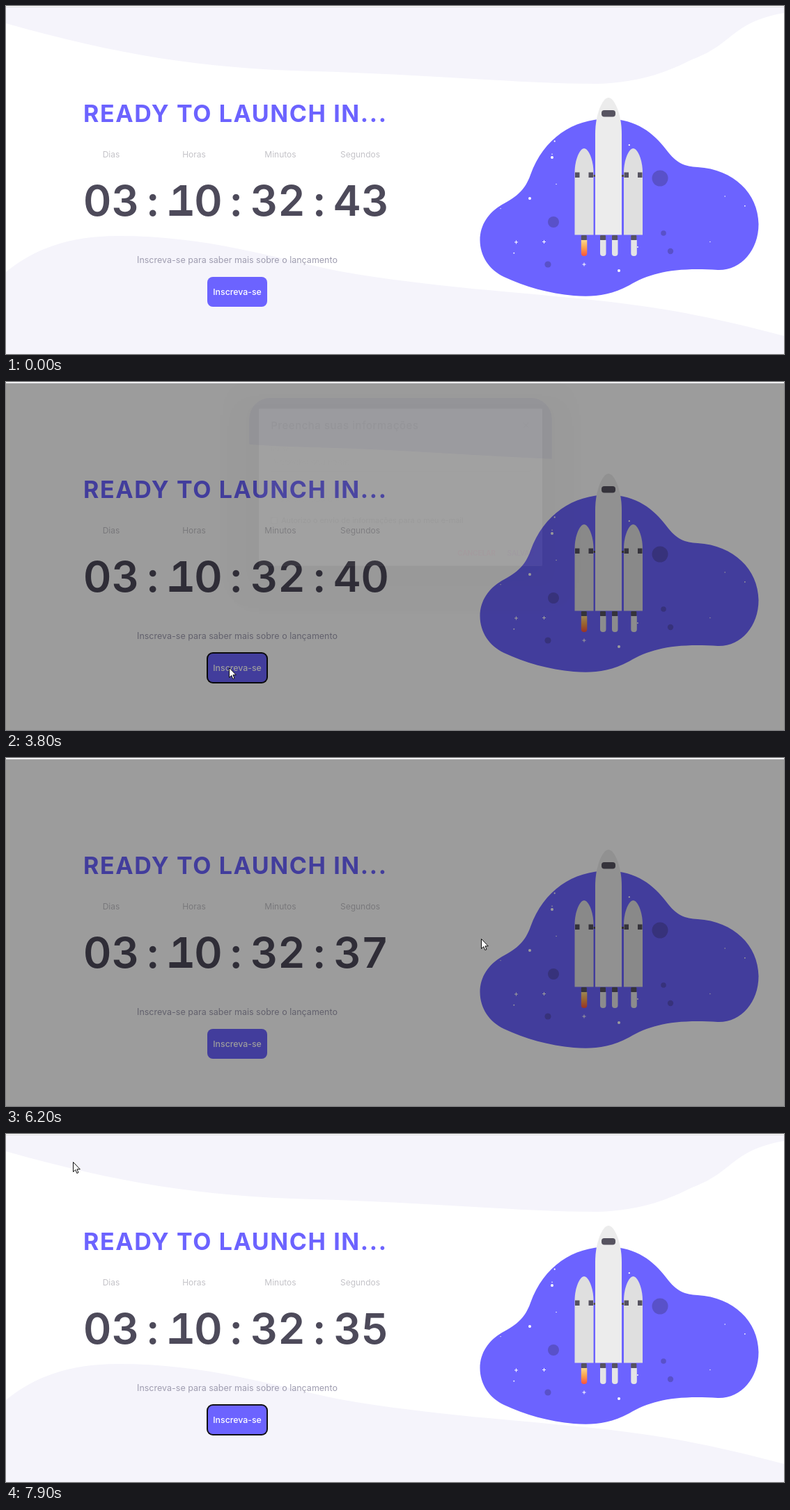
Write an HTML page with a canvas that moves like this. It is 1117 px wide and 501 px high and loops after 8000 ms.

```html
<!DOCTYPE html>
<html lang="pt">
<head>
<meta charset="utf-8">
<title>Ready to launch</title>
<style>
  html, body { margin: 0; width: 100%; height: 100%; overflow: hidden; background: #fff; }
  canvas { display: block; }
</style>
</head>
<body>
<canvas id="stage" width="1117" height="501"></canvas>
<script>
const W = 1117, H = 501, LOOP = 8000, STEP = 100;
const ctx = document.getElementById('stage').getContext('2d');
const PURPLE = '#6c63ff', DARK = '#4d4a5a', METAL = '#565360', LAVENDER = '#f5f4fb';
const SCRIM_ALPHA = .39;
const DIALOG = { x: 333, y: 22, w: 467, h: 259, cx: 566.5, cy: 151.5 };

const topWave = new Path2D(`M0 25 C160 70 280 90 440 94 S740 112 850 112
  C915 110 955 92 985 77 C1045 55 1040 24 ${W} 10 V0 H0Z`);
const bottomWave = new Path2D(`M0 383 C40 350 90 331 160 331 C290 331 380 362 480 382
  C610 405 740 412 850 424 S1030 452 ${W} 475 V${H} H0Z`);
const blob = new Path2D(`M680.5 337 C680.5 315 693 297 712 286 C735 274 746 263 753 243
  C772 190 815 162 865 162.5 C905 163 930 183 948 207 C963 227 975 231 993 232
  C1045 235 1080 270 1080.5 314 C1080.5 352 1055 381 1022 380 C960 376 925 384 895 402
  C865 418 840 419 815 417 C780 414 745 404 715 390 C694 380 680.5 360 680.5 337Z`);

// Pointer legs: [from ms, to ms, x, y]
const ARRIVE = [[600, 600, 11, 7], [600, 1000, 81, 241], [1100, 1700, 141, 408], [2500, 3200, 320, 411],
  [4900, 5300, 598, 285], [5400, 5900, 682, 260], [6200, 6400, 672, 280], [6400, 6800, 560, 390]];
const RETURN = [[7300, 7300, 25, 2], [7300, 7900, 96, 40]];

const ramp = (t, from, to) => t >= to ? 1 : Math.max(0, (t - from) / (to - from));
const easeOut = p => 1 - (1 - p) ** 2;

function glide(legs, t) {
  let [, , x, y] = legs[0];
  for (const [from, to, toX, toY] of legs) {
    const p = ramp(t, from, to);
    x += (toX - x) * p;
    y += (toY - y) * p;
  }
  return [x, y];
}

function random(seed) {
  return () => (seed = seed * 16807 % 2147483647) / 2147483647;
}

function rect(x, y, w, h, color, radius = 0) {
  ctx.fillStyle = color;
  ctx.beginPath();
  ctx.roundRect(x, y, w, h, radius);
  ctx.fill();
}

function dot(x, y, r, color) {
  ctx.fillStyle = color;
  ctx.beginPath();
  ctx.arc(x, y, r, 0, Math.PI * 2);
  ctx.fill();
}

function line(x1, y1, x2, y2, color, width = 1) {
  ctx.strokeStyle = color;
  ctx.lineWidth = width;
  ctx.beginPath();
  ctx.moveTo(x1, y1);
  ctx.lineTo(x2, y2);
  ctx.stroke();
}

function text(str, x, y, size, color, { weight = 400, align = 'left', spacing = 0 } = {}) {
  ctx.font = `${weight} ${size}px Inter, sans-serif`;
  ctx.letterSpacing = spacing + 'px';
  ctx.textAlign = align;
  ctx.fillStyle = color;
  ctx.fillText(str, x, y);
}

function hull(x, w, tip, shoulder, bottom, color) {
  const mid = x + w / 2, bend = tip + (shoulder - tip) * .45;
  ctx.fillStyle = color;
  ctx.beginPath();
  ctx.moveTo(x, bottom);
  ctx.lineTo(x, shoulder);
  ctx.bezierCurveTo(x, bend, mid - w * .22, tip, mid, tip);
  ctx.bezierCurveTo(mid + w * .22, tip, x + w, bend, x + w, shoulder);
  ctx.lineTo(x + w, bottom);
  ctx.fill();
}

function engine(x, color) {
  rect(x, 330, 8, 7, METAL, 1);
  rect(x, 337, 8.5, 23, color, [0, 0, 4, 4]);
}

function drawRocket() {
  const flame = ctx.createLinearGradient(0, 337, 0, 360);
  ['#fbd98a', '#fba04b', '#f9523f'].forEach((color, i) => flame.addColorStop(i / 2, color));
  engine(825.8, flame);
  [853, 870, 897.3].forEach(x => engine(x, '#e4e4e6'));
  rect(843, 243, 44, 3, DARK);
  for (const x of [816.5, 887]) {
    hull(x, 27, 205, 240, 329.5, '#dfdfdf');
    rect(x + .5, 239.5, 6.5, 7.5, METAL);
    rect(x + 20, 239.5, 6.5, 7.5, METAL);
  }
  hull(846, 38, 132, 184, 329.5, '#ececec');
  rect(855, 150, 20, 9.5, METAL, 4);
}

function drawSpace() {
  ctx.fillStyle = PURPLE;
  ctx.fill(blob);
  const craters = [[939, 248, 11.5], [786, 311, 8], [944, 327, 3.8], [954, 353, 4.2], [778, 372, 4.6]];
  for (const [x, y, r] of craters) dot(x, y, r, '#5951c9');
  for (const [x, y] of [[784, 218], [752, 277], [880, 381]]) dot(x, y, 2, '#fff');
  for (const [x, y] of [[732.5, 340], [772.5, 339.5], [830, 372]]) {
    line(x - 2.5, y, x + 2.5, y, '#fff');
    line(x, y - 2.5, x, y + 2.5, '#fff');
  }
  const next = random(42);
  for (let i = 0; i < 20; i++) {
    const x = 690 + 380 * next(), y = 170 + 230 * next(), r = .6 + .6 * next();
    if (ctx.isPointInPath(blob, x, y)) dot(x, y, r, '#fff');
  }
  drawRocket();
}

function drawClock(seconds) {
  [...`03:10:32:${seconds}`].forEach((ch, i) => {
    const x = 131 + 39.85 * i;
    text(ch, x, 302, 61, DARK, { weight: 600, align: 'center' });
    if (ch === '1') rect(x - 16, 294, 33, 8, DARK);
  });
}

function drawButton(focused) {
  if (focused) rect(288, 389, 88, 45, '#101014', 9);
  const inset = focused ? 1 : 0;
  rect(289 + inset, 390 + inset, 86 - 2 * inset, 43 - 2 * inset, PURPLE, 8 - inset);
  text('Inscreva-se', 332, 415.5, 12.3, '#fff', { weight: 500, align: 'center' });
}

function drawPage(seconds, focused) {
  text('READY TO LAUNCH IN...', 111, 167, 34, PURPLE, { weight: 700, spacing: 1.6 });
  const labels = { Dias: 151, Horas: 270, Minutos: 394, Segundos: 508.5 };
  for (const name in labels) text(name, labels[name], 218, 12, '#c4c3c8', { align: 'center' });
  drawClock(seconds);
  text('Inscreva-se para saber mais sobre o lançamento', 332, 370, 12.5, '#9f9db0', { align: 'center' });
  drawButton(focused);
  drawSpace();
}

function drawWaves(scrim, open, zoom) {
  ctx.fillStyle = LAVENDER;
  ctx.globalAlpha = 1 - scrim;
  ctx.fill(topWave);
  ctx.fill(bottomWave);
  ctx.globalAlpha = 1;
  if (!open) return;
  // The tint stays visible only around the dialog
  const pad = 12 + 34 * open, half = DIALOG.w / 2 * zoom + pad;
  ctx.save();
  ctx.beginPath();
  ctx.roundRect(DIALOG.cx - half, 38 - pad * 1.1, half * 2, 300, 30);
  ctx.clip();
  ctx.fill(topWave);
  ctx.restore();
}

function drawShadow({ x, y, w, h }) {
  ctx.save();
  ctx.beginPath();
  ctx.rect(0, -H, W, 3 * H);
  ctx.rect(x, y, w, h);
  ctx.clip('evenodd');
  for (const [drop, blur, alpha] of [[11, 15, .2], [24, 38, .14], [9, 46, .12]]) {
    ctx.shadowColor = `rgba(0,0,0,${alpha})`;
    ctx.shadowBlur = blur;
    ctx.shadowOffsetY = drop;
    rect(x, y, w, h, '#fff');
  }
  ctx.restore();
}

function field(label, hint, y) {
  text(label, 353, y, 10.4, '#b0b0b0');
  text(hint, 353, y + 24, 14, '#a2a2a2', { weight: 300 });
  line(353, y + 33.5, 779.5, y + 33.5, '#8f8f8f');
}

function drawDialog(open, zoom) {
  const { x, y, w, h, cx, cy } = DIALOG;
  ctx.save();
  ctx.globalAlpha = open;
  ctx.translate(cx, cy);
  ctx.scale(zoom, zoom);
  ctx.translate(-cx, -cy);
  drawShadow(DIALOG);
  rect(x, y, w, h, '#fff', 2);
  text('Preencha suas informações', 353, 56, 17, '#222', { weight: 500, spacing: .7 });
  line(769, 45, 777, 53, '#777', 1.3);
  line(777, 45, 769, 53, '#777', 1.3);
  field('Nome', 'Preencha seu nome', 91);
  field('E-mail', 'Preencha seu email', 151);
  rect(353, 201, 11, 11, '#707070', 2.5);
  rect(354, 202, 9, 9, '#fff', 1.5);
  text('Autorizo o envio de informações para o meu e-mail', 370, 211, 12.4, '#333');
  text('CANCELAR', 691.5, 264, 11.5, '#f0356f', { weight: 500, align: 'center' });
  text('SALVAR', 764, 264, 11.5, '#9c27b0', { weight: 500, align: 'center' });
  ctx.restore();
}

function drawPointer([x, y]) {
  ctx.save();
  ctx.translate(Math.round(x) + .5, Math.round(y) + .5);
  const arrow = new Path2D('M0 0 V14 L3.2 11 L5.3 16 L7.5 15 L5.4 10.3 H9.8Z');
  ctx.fillStyle = '#fff';
  ctx.fill(arrow);
  ctx.strokeStyle = '#111';
  ctx.lineWidth = 1;
  ctx.stroke(arrow);
  ctx.restore();
}

function draw(t) {
  const scrim = ramp(t, 3600, 3800) - ramp(t, 6200, 6400);
  const open = ramp(t, 3795, 3900) - ramp(t, 6000, 6200);
  const zoom = .8 + .2 * easeOut(ramp(t, 3750, 4000));
  const lead = t < 4000 ? 100 : 300;
  const seconds = 43 - Math.floor((t + lead) / 1000);
  const focused = (t >= 3400 && t < 3900) || t >= 6400;

  rect(0, 0, W, H, '#fff');
  drawWaves(scrim, open, zoom);
  drawPage(seconds, focused);
  rect(0, 2, W, H - 2, `rgba(0,0,0,${SCRIM_ALPHA * scrim})`);
  rect(0, 0, W, 2, '#fff');
  rect(0, 1, W, 1, '#e0e0e3');
  if (open > 0) drawDialog(open, zoom);
  if (t >= 600 && t < 6900) drawPointer(glide(ARRIVE, t));
  if (t >= 7300) drawPointer(glide(RETURN, t));
}

const start = performance.now();
function frame() {
  const t = (performance.now() - start) % LOOP;
  draw(Math.floor(t / STEP) * STEP);
  requestAnimationFrame(frame);
}
frame();
</script>
</body>
</html>
```
